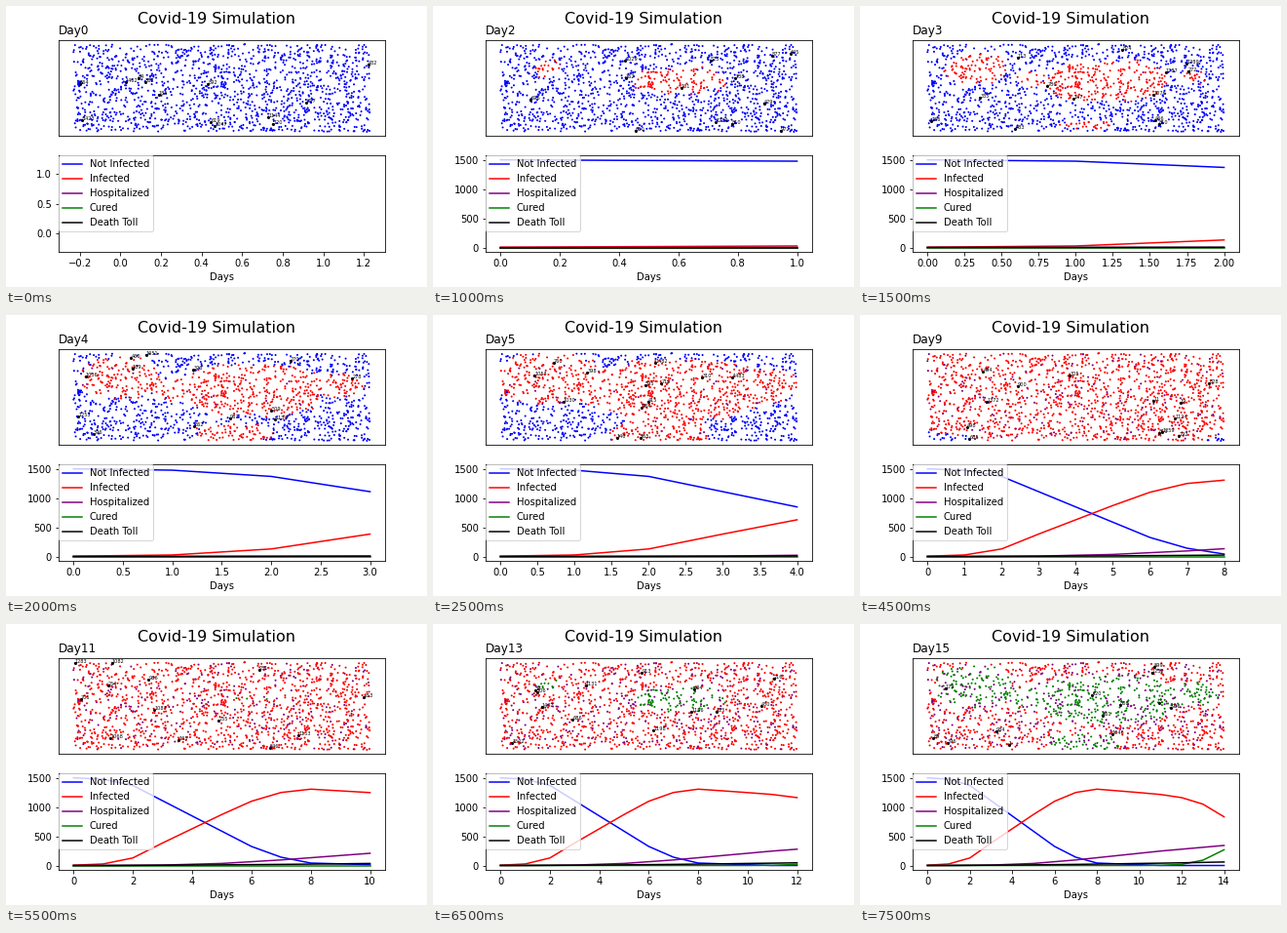
These frames come from a looping animation (432x288 px, 8 s). A matplotlib script:

```python
import numpy as np
import matplotlib.pyplot as plt
from matplotlib.animation import FuncAnimation

DAYS = 16
PEOPLE = 1505
TRAVELLERS = 13
RECOVERY_DAYS = 11
RECOVERY_RATE = 0.68


def curve(days, *keys):
    """Straight runs through (day, count) key points."""
    return np.interp(days, *zip(*keys))


def healthy_on(days):
    return curve(days, (0, 1500), (1, 1477), (2, 1370), (6, 326),
                 (7, 142), (8, 42), (11, 0))


day_axis = np.arange(DAYS)
healthy = healthy_on(day_axis).astype(int)
hospital = curve(day_axis, (0, 0), (3, 7), (5, 35), (7, 95),
                 (11, 247), (15, 375)).astype(int)
dead = (0.88 * day_axis ** 1.6).astype(int)
caught_earlier = PEOPLE - healthy_on(day_axis - RECOVERY_DAYS)
cured = np.where(day_axis < RECOVERY_DAYS, 0,
                 RECOVERY_RATE * caught_earlier).astype(int)
infected = PEOPLE - healthy - hospital - cured - dead

SERIES = [
    ("Not Infected", "blue", healthy),
    ("Infected", "red", infected),
    ("Hospitalized", "purple", hospital),
    ("Cured", "green", cured),
    ("Death Toll", "black", dead),
]

# Outbreaks: left x, right x, y (0..1 in the town), delay
OUTBREAKS = [
    (0.16, 0.16, 0.72, 4),
    (0.53, 0.68, 0.58, 0),
    (0.36, 0.36, 0.60, 12),
    (0.89, 0.89, 0.63, 13),
    (0.48, 0.60, 0.08, 16),
]

rng = np.random.default_rng(19)
home = rng.random((PEOPLE, 2))


def exposure(x0, x1, y, delay):
    """Spread distance from an outbreak; it runs twice as fast sideways."""
    x = home[:, 0]
    dx = np.maximum(np.maximum(x0 - x, x - x1), 0)
    return np.hypot(dx * 152, (home[:, 1] - y) * 90) + delay


reach = np.min([exposure(*o) for o in OUTBREAKS], axis=0)
order = np.argsort(reach + rng.normal(0, 1.2, PEOPLE))
luck = rng.random(PEOPLE)


def states(day):
    """Colour of every person, and who is still shown."""
    color = np.full(PEOPLE, "blue", dtype="<U6")
    shown = np.ones(PEOPLE, bool)
    if day == 0:
        return color, shown
    sick = order[:PEOPLE - healthy[day]]
    color[sick] = "red"
    unlucky = sick[np.argsort(luck[sick])]
    lost, beds = dead[day], hospital[day]
    shown[unlucky[:lost]] = False
    color[unlucky[lost:lost + beds]] = "purple"
    recovering = sick[(color[sick] == "red") & shown[sick]]
    color[recovering[:cured[day]]] = "green"
    return color, shown


fig, (town, chart) = plt.subplots(2, 1, figsize=(6, 4), dpi=72)
fig.subplots_adjust(left=0.125, right=0.9, bottom=0.125, top=0.88, hspace=0.2)
fig.suptitle("Covid-19 Simulation", fontsize=16)

town.set(xticks=[], yticks=[], xlim=(-0.05, 1.05), ylim=(-0.05, 1.05))
title = town.set_title("Day0", loc="left")
crowd = town.scatter(home[:, 0], home[:, 1], s=1)
movers = town.scatter([0], [0], s=4, color="black")
tags = [town.text(0, 0, "", fontsize=5) for _ in range(TRAVELLERS)]

chart.set_xlabel("Days")
lines = [chart.plot([], [], color=c, label=name)[0] for name, c, _ in SERIES]
chart.legend(loc="upper left", borderaxespad=0)


def update(day):
    title.set_text(f"Day{day}")

    color, shown = states(day)
    crowd.set_offsets(home[shown])
    crowd.set_color(color[shown].tolist())

    picks = np.random.default_rng(100 + day).choice(
        np.flatnonzero(shown), TRAVELLERS, replace=False)
    movers.set_offsets(home[picks])
    for tag, who in zip(tags, picks):
        tag.set_position(home[who])
        tag.set_text(str(who))

    for line, (_, _, values) in zip(lines, SERIES):
        line.set_data(day_axis[:day], values[:day])
    if day == 0:
        chart.set(xlim=(-0.304, 1.304), ylim=(-0.304, 1.304))
    else:
        last = day - 1
        pad = 0.05 * last or 0.055
        chart.set(xlim=(-pad, last + pad), ylim=(-75, 1575))
    return [title, crowd, movers, *tags, *lines]


anim = FuncAnimation(fig, update, frames=DAYS, interval=500,
                     repeat=True, repeat_delay=0, blit=False)
plt.show()
```
